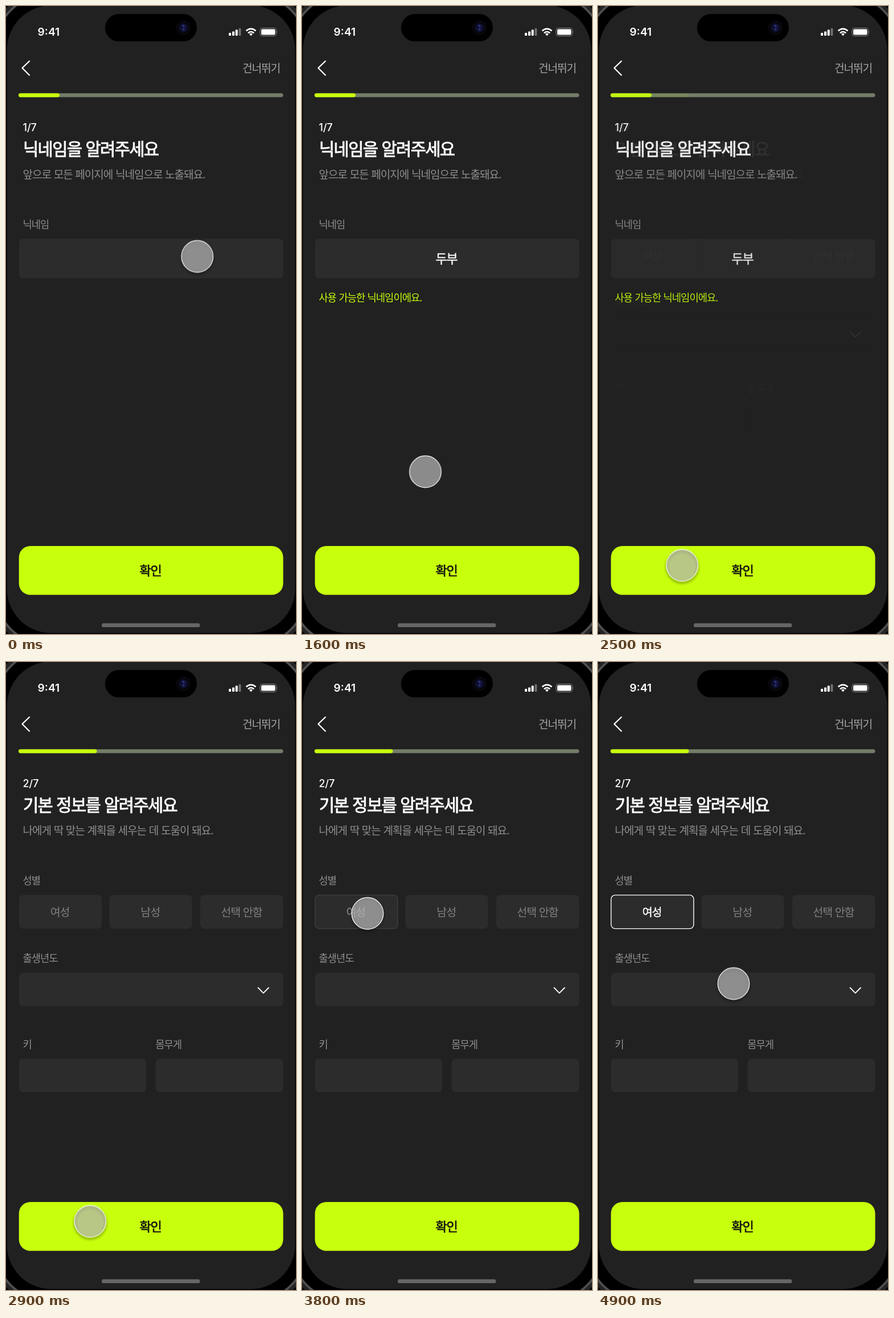
These frames come from a looping animation (509x1099 px, 5 s). An HTML page:

```html
<!DOCTYPE html>
<html lang="ko">
<head>
<meta charset="utf-8">
<title>닉네임 입력</title>
<style>
  html, body { margin: 0; width: 100%; height: 100%; overflow: hidden; background: #000; }
  svg { display: block; width: 509px; height: 1099px; }
  text {
    font-family: "Noto Sans CJK KR", "Noto Sans CJK", sans-serif;
    letter-spacing: -.056em; word-spacing: .02em; fill: #fff;
  }
  .num { font-family: Inter, sans-serif; letter-spacing: 0; word-spacing: 0; }
  .step { font-size: 18px; font-weight: 500; }
  .title { font-size: 29.6px; stroke: #fff; stroke-width: .9px; }
  .sub { font-size: 19.1px; fill: #8e8e8e; }
  .label { font-size: 17.7px; fill: #8e8e8e; }
  .mid { text-anchor: middle; }
  .option { font-size: 19.5px; fill: #808080; }
  .chosen { fill: #fff; stroke: #fff; stroke-width: .4px; }
  .entry { font-size: 22px; stroke: #fff; stroke-width: .4px; }
  .confirm { font-size: 22px; fill: #111; stroke: #111; stroke-width: .7px; }
  .hint { font-size: 17.7px; fill: #c8ff0c; }
  .box { fill: #2c2c2c; }
  .lime { fill: #c8ff0c; }
  .line { fill: none; stroke: #fff; stroke-linecap: round; stroke-linejoin: round; }

  .filled, .first, .next, .picked, .cursor, .shadow { animation: 5s linear infinite; }
  .filled { animation-name: fill-in; }
  .first { animation-name: leave; }
  .next { animation-name: enter; }
  .picked { animation-name: pick; }
  .cursor { animation-name: move; }
  .shadow { animation-name: rest; }

  @keyframes fill-in {
    0%, 20% { opacity: 0; animation-timing-function: ease-out; }
    26.6%, 100% { opacity: 1; }
  }
  @keyframes leave {
    0%, 49.7% { opacity: 1; animation-timing-function: ease-out; }
    56.7%, 100% { opacity: 0; }
  }
  @keyframes enter {
    0%, 49.7% { opacity: 0; animation-timing-function: ease-out; }
    56.7%, 100% { opacity: 1; }
  }
  @keyframes pick {
    0%, 75.6% { opacity: 0; animation-timing-function: ease-out; }
    81.6%, 100% { opacity: 1; }
  }
  @keyframes move {
    0%, 25% { transform: translate(335.7px, 438.3px); animation-timing-function: cubic-bezier(.5, 0, .8, .75); }
    32% { transform: translate(216.5px, 815px); animation-timing-function: cubic-bezier(.2, .4, .5, 1); }
    38%, 60% { transform: translate(147.7px, 978.7px); animation-timing-function: cubic-bezier(.5, 0, .8, .75); }
    66% { transform: translate(152.7px, 609px); animation-timing-function: cubic-bezier(.2, .4, .5, 1); }
    71%, 82% { transform: translate(115px, 440px); animation-timing-function: cubic-bezier(.5, 0, .8, .75); }
    86% { transform: translate(167.3px, 495px); animation-timing-function: cubic-bezier(.2, .4, .5, 1); }
    92%, 100% { transform: translate(238px, 562.8px); }
  }
  @keyframes rest {
    0%, 24% { opacity: .35; }
    26%, 38% { opacity: 0; }
    40%, 59% { opacity: .35; }
    61%, 71% { opacity: 0; }
    73%, 81% { opacity: .35; }
    83%, 92% { opacity: 0; }
    94%, 100% { opacity: .35; }
  }
</style>
</head>
<body>
<svg viewBox="0 0 509 1099">
  <defs>
    <filter id="soft" x="-30%" y="-30%" width="160%" height="160%">
      <feGaussianBlur stdDeviation="2"/>
    </filter>
  </defs>

  <!-- phone body -->
  <rect width="509" height="1099"/>
  <rect x="-21" y="-22" width="551" height="1142" rx="100" fill="none" stroke="#505050" stroke-width="4"/>
  <rect x="-26" y="-27" width="561" height="1152" rx="105" fill="none" stroke="#242424" stroke-width="6"/>
  <rect x="1.5" y="-1" width="506" height="1098.5" rx="78" fill="#212121"/>

  <!-- status bar -->
  <text class="num" x="55.5" y="51.7" font-size="19.2" font-weight="600">9:41</text>
  <rect x="174" y="14" width="161" height="48" rx="24"/>
  <circle cx="311.5" cy="38" r="13" fill="#07070c"/>
  <circle cx="311.5" cy="38" r="7.5" fill="#0f1030"/>
  <circle cx="311.5" cy="35" r="2.2" fill="#2c3078"/>
  <circle cx="311.5" cy="41" r="2.2" fill="#282c70"/>
  <g fill="#fff">
    <rect x="391" y="47" width="4" height="5" rx="1"/>
    <rect x="397" y="44.5" width="4" height="7.5" rx="1"/>
    <rect x="402.7" y="41.5" width="4" height="10.5" rx="1"/>
    <rect x="408.4" y="39" width="4" height="13" rx="1" opacity=".35"/>
    <path d="M430 52.3l-3-3.2q3-2.5 6 0z"/>
  </g>
  <g class="line" stroke-width="2.6" style="stroke-linecap:butt">
    <path d="M421.6 43.6q8.4-7.4 16.8 0"/>
    <path d="M424.8 47.2q5.2-4.4 10.4 0"/>
  </g>
  <rect x="446" y="38.5" width="28.5" height="14" rx="4" fill="none" stroke="#858585"/>
  <rect x="448" y="40.5" width="24.5" height="10" rx="2.3" fill="#fff"/>
  <path d="M476 43q1.7 2.4 0 5z" fill="#858585"/>

  <!-- header -->
  <path class="line" stroke-width="2.3" d="M41 96.5L28.5 108.5L41 121"/>
  <text x="415" y="115.6" font-size="19.1" style="fill:#a6a6a6">건너뛰기</text>
  <rect x="22" y="152.7" width="464.5" height="6.8" rx="3.4" fill="#737d66"/>

  <!-- step one -->
  <g class="first">
    <rect class="lime" x="22" y="152.7" width="72" height="6.8" rx="3.4"/>
    <text class="num step" x="29.5" y="218.6">1/7</text>
    <text class="title" x="30" y="261">닉네임을 알려주세요</text>
    <text class="sub" x="29.5" y="302.2">앞으로 모든 페이지에 닉네임으로 노출돼요.</text>
    <text class="label" x="29.5" y="389">닉네임</text>
    <rect class="box" x="23" y="407.5" width="463.5" height="69" rx="7"/>
    <g class="filled">
      <text class="entry mid" x="253.6" y="450">두부</text>
      <text class="hint" x="29.5" y="516.8">사용 가능한 닉네임이에요.</text>
    </g>
  </g>

  <!-- step two -->
  <g class="next">
    <rect class="lime" x="22" y="152.7" width="137.5" height="6.8" rx="3.4"/>
    <text class="num step" x="29.5" y="218.6">2/7</text>
    <text class="title" x="30" y="261">기본 정보를 알려주세요</text>
    <text class="sub" x="29.5" y="302.2">나에게 딱 맞는 계획을 세우는 데 도움이 돼요.</text>

    <text class="label" x="29.5" y="389">성별</text>
    <rect class="box" x="23" y="407.7" width="145" height="59" rx="7"/>
    <rect class="box" x="181.5" y="407.7" width="145" height="59" rx="7"/>
    <rect class="box" x="341" y="407.7" width="145.5" height="59" rx="7"/>
    <text class="option mid" x="94.6" y="445.3">여성</text>
    <text class="option mid" x="253.2" y="445.3">남성</text>
    <text class="option mid" x="413.4" y="445.3">선택 안함</text>
    <g class="picked">
      <rect class="box" x="23" y="407.9" width="145" height="58.7" rx="7" stroke="#fff" stroke-width="1.4"/>
      <text class="option chosen mid" x="94.6" y="445.3">여성</text>
    </g>

    <text class="label" x="29.5" y="525.2">출생년도</text>
    <rect class="box" x="23" y="543.7" width="463.5" height="58.5" rx="7"/>
    <path class="line" stroke-width="1.8" d="M442.5 570L451.7 579.3L461 570"/>

    <text class="label" x="29.5" y="675.7">키</text>
    <text class="label" x="262.3" y="675.7">몸무게</text>
    <rect class="box" x="23" y="694.3" width="223" height="58.5" rx="7"/>
    <rect class="box" x="262.7" y="694.3" width="223.8" height="58.5" rx="7"/>
  </g>

  <!-- footer -->
  <rect class="lime" x="22.7" y="945" width="463.8" height="85.5" rx="20"/>
  <text class="confirm mid" x="253.6" y="996">확인</text>
  <rect x="168" y="1080.3" width="172.5" height="6.8" rx="3.4" fill="#666"/>

  <g class="cursor">
    <circle class="shadow" cy="3" r="27" fill="none" stroke="#000" stroke-width="4" filter="url(#soft)"/>
    <circle r="27.8" fill="#b2b2b2" fill-opacity=".73" stroke="#fff" stroke-width="1.2"/>
  </g>
</svg>
<script>
  // Hold every pose for a tenth of a second.
  const LOOP = 5000, TICK = 100;
  const parts = document.getAnimations();
  parts.forEach(part => part.pause());
  const start = performance.now();

  function draw() {
    const time = Math.max(0, performance.now() - start) % LOOP;
    const pose = Math.floor(time / TICK) * TICK;
    parts.forEach(part => { part.currentTime = pose; });
    requestAnimationFrame(draw);
  }
  draw();
</script>
</body>
</html>
```
